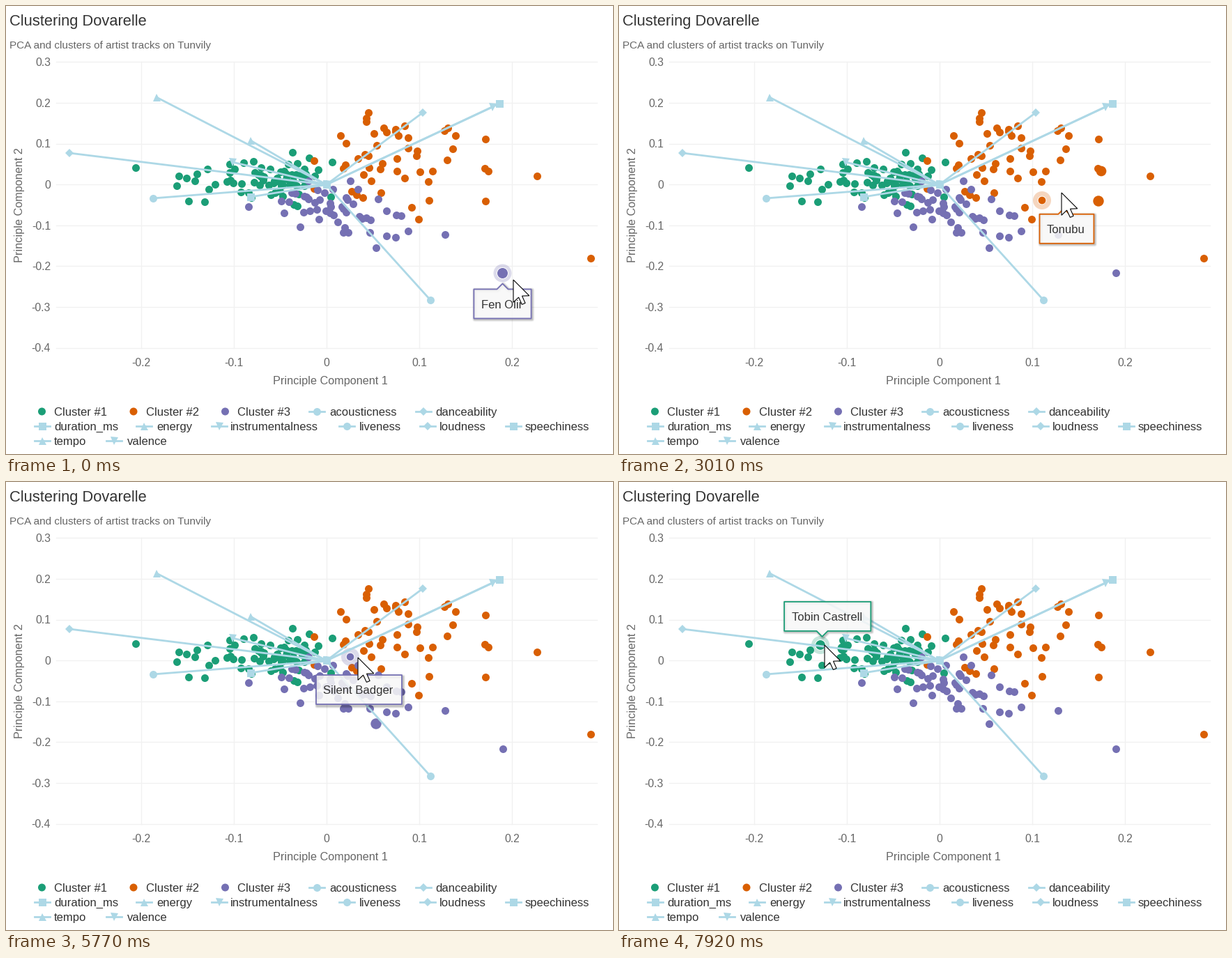
A matplotlib script that plays this animation: 871x643 px, repeating every 8000 ms.

```python
import numpy as np
import matplotlib.pyplot as plt
from matplotlib.animation import FuncAnimation
from matplotlib.patches import Circle, Polygon

W, H = 871, 643
STEP, SUB = 77, 11            # pointer refresh and easing substep, ms
FRAMES, INTERVAL = 200, 40
GREEN, ORANGE, PURPLE, BLUE = "#1b9e77", "#d95f02", "#7570b3", "#add8e6"
DARK, GREY = "#333333", "#666666"
R = 5.5

plt.rcParams["font.family"] = "Liberation Sans"
fig = plt.figure(figsize=((W + .001) / 72, (H + .001) / 72), dpi=72, facecolor="white")
ax = fig.add_axes([0, 0, 1, 1])
ax.set_xlim(0, W)
ax.set_ylim(H, 0)
ax.axis("off")


def put(x, y, s, size=16.6, color=DARK, ha="left", z=6):
    """Text whose capitals are centred on y."""
    return ax.text(x, y + .36 * size, s, fontsize=size, color=color, ha=ha,
                   va="baseline", zorder=z)


# grid and axes
for i in range(8):
    y = 80.5 + 58.6 * i
    ax.plot([72, 848], [y, y], color="#f1f1f1", lw=1.4, zorder=1)
    put(64, y, f"{0.3 - 0.1 * i:.1f}" if i != 3 else "0", 15.8, GREY, "right")
for i in range(5):
    x = 194 + 133 * i
    ax.plot([x, x], [80, 491], color="#f1f1f1", lw=1.4, zorder=1)
    put(x, 511, f"{0.1 * (i - 2):.1f}" if i != 2 else "0", 15.8, GREY, "center")
put(465.5, 537, "Principle Component 1", 16.3, GREY, "center")
ax.text(19.5, 285.5, "Principle Component 2", fontsize=16.3, color=GREY,
        rotation=90, ha="center", va="center")
put(5, 20, "Clustering Dovarelle", 21.9)
put(5, 55, "PCA and clusters of artist tracks on Tunvily", 15.3, GREY)

# clusters
rng = np.random.default_rng(4)
core = np.column_stack([rng.uniform(356, 432, 26), rng.uniform(237, 259, 26)])
green = [
    (186, 232), (248, 244), (259, 247), (245, 258), (262, 280), (271, 251),
    (274, 241), (285, 281), (289, 234), (291, 263), (300, 256), (321, 227),
    (328, 234), (321, 239), (341, 225), (355, 223), (317, 252), (322, 250),
    (326, 254), (338, 255), (337, 267), (348, 268), (352, 275), (366, 232),
    (357, 239), (366, 243), (379, 234), (411, 210), (435, 218), (418, 226),
    (405, 227), (428, 234), (448, 235), (468, 224), (399, 237), (412, 251),
    (356, 253), (364, 257), (377, 257), (380, 271), (386, 268), (413, 285),
    (418, 287), (397, 273), (393, 266), (443, 244), (466, 274), (420, 270)]
orange = [
    (520, 153), (517, 161), (517, 166), (542, 175), (546, 181), (559, 177),
    (559, 180), (572, 172), (563, 186), (577, 189), (528, 183), (480, 186),
    (488, 197), (532, 200), (577, 204), (590, 208), (589, 215), (561, 219),
    (515, 213), (520, 215), (505, 219), (487, 228), (484, 233), (540, 226),
    (537, 234), (521, 232), (513, 242), (524, 251), (561, 237), (572, 247),
    (594, 238), (612, 237), (606, 252), (633, 221), (641, 205), (645, 186),
    (629, 179), (634, 175), (688, 191), (687, 233), (692, 237), (762, 244),
    (688, 280), (607, 279), (582, 289), (592, 306), (538, 268), (496, 266),
    (503, 271), (512, 275), (442, 222), (442, 262), (839, 362)]
purple = [
    (348, 288), (399, 297), (422, 317), (395, 280), (406, 281), (410, 268),
    (415, 269), (428, 273), (434, 277), (431, 274), (447, 264), (450, 278),
    (443, 282), (446, 292), (436, 294), (427, 296), (449, 306), (457, 268),
    (469, 263), (465, 283), (466, 288), (459, 294), (465, 297), (470, 300),
    (476, 310), (482, 288), (484, 291), (488, 296), (488, 275), (490, 278),
    (498, 284), (494, 251), (505, 263), (534, 277), (546, 294), (560, 300),
    (567, 301), (507, 302), (511, 305), (517, 304), (523, 307), (486, 318),
    (491, 325), (484, 325), (522, 325), (546, 330), (559, 332), (577, 323),
    (630, 328), (531, 347), (712.5, 383.5), (434, 251)]
for pts, color in ((np.vstack([green, core]), GREEN), (orange, ORANGE), (purple, PURPLE)):
    ax.scatter(*np.transpose(pts), s=(2 * R) ** 2, color=color, linewidths=0, zorder=2)

# feature vectors
SIZE = {"o": 11, "D": 8.2, "s": 11, "^": 11, "v": 11}


def line(xs, ys, mark, every=None):
    ax.plot(xs, ys, color=BLUE, lw=2.8, marker=mark, ms=SIZE[mark], mew=0,
            markevery=every, zorder=5)


for x, y, mark in ((609, 422, "o"), (598, 153, "D"), (351, 274, "s"), (216, 131, "^"),
                   (325, 224, "v"), (211, 276, "o"), (91, 211, "D"), (708, 140, "s"),
                   (351, 193, "^"), (698, 145, "v")):
    line([459.5, x], [256.5, y], mark)

# legend
for i, color in enumerate((GREEN, ORANGE, PURPLE)):
    x = 51.5 + 131.5 * i
    ax.add_patch(Circle((x, 582), R, color=color, lw=0))
    put(x + 17.5, 582, f"Cluster #{i + 1}")
for x, tx, y, mark, name in (
        (446, 464, 582, "o", "acousticness"), (599, 616, 582, "D", "danceability"),
        (52, 69, 603, "s", "duration_ms"), (198, 216, 603, "^", "energy"),
        (305.5, 322, 603, "v", "instrumentalness"), (489, 507, 603, "o", "liveness"),
        (605, 622, 603, "D", "loudness"), (727.5, 745, 603, "s", "speechiness"),
        (51.5, 69, 624, "^", "tempo"), (155, 174, 624, "v", "valence")):
    line([x - 11, x, x + 11], [y] * 3, mark, [1])
    put(tx, y, name)

# hovered points: start ms, x, y, colour, label
HOVERS = [
    (-900, 712.5, 383.5, PURPLE, "Fen Olir"),
    (230, 839, 362, ORANGE, "Amber Quillon"),
    (740, 762, 244, ORANGE, "Nova Lanterel"),
    (1465, 688, 280, ORANGE, "Matthis Velo"),
    (1860, 692, 237, ORANGE, "Velvet Teapots"),
    (2846, 688, 280, ORANGE, "Matthis Velo"),
    (2970, 607, 279, ORANGE, "Tonubu"),
    (3520, 592, 306, ORANGE, "Pine Kettle"),
    (4600, 560, 300, PURPLE, "Nightmill"),
    (4740, 546, 294, PURPLE, "Copper Stairmen"),
    (4920, 517, 304, PURPLE, "KZF"),
    (5250, 531, 347, PURPLE, "Northern Bicyclers"),
    (5745, 494, 251, PURPLE, "Silent Badger"),
    (6300, 411, 210, GREEN, "Hollow Gardeners"),
    (6690, 399, 237, GREEN, "Coastal Attics"),
    (7500, 366, 243, GREEN, "Elda Frost"),
    (7680, 321, 239, GREEN, "Tin Meadow"),
    (7814, 289, 234, GREEN, "Tobin Castrell")]
STARTS = [h[0] for h in HOVERS]
TIP_H = 42

# pointer path: ms, x, y
PATH = np.array([
    (80, 728, 393), (400, 812, 373), (600, 824, 364), (850, 798, 342),
    (1155, 774, 258), (1300, 768, 250), (1694, 705, 267), (1940, 708, 252),
    (2200, 703, 238), (2550, 704, 244), (2800, 702, 262), (2880, 690, 271),
    (3003, 635, 268), (3390, 612, 285), (3700, 598, 303), (4010, 600, 307),
    (4390, 600, 307), (4700, 568, 296), (4850, 548, 291), (5005, 523, 298),
    (5160, 526, 318), (5400, 537, 346), (5600, 524, 303), (5775, 505, 252),
    (6000, 502, 250), (6300, 452, 232), (6600, 414, 222), (7007, 391, 238),
    (7350, 391, 241), (7600, 350, 240), (7931, 295, 234)])
ARROW = 1.9 * np.array([(0, 0), (0, 17), (4, 13.2), (6.5, 18.6), (9, 17.6),
                        (6.6, 12.2), (12, 12)])

shadows = [ax.add_patch(Polygon([(0, 0)] * 3, fill=False, ec="black", lw=lw, alpha=a,
                                joinstyle="round", zorder=7))
           for lw, a in ((7, .05), (5, .08), (3, .12))]
tip = ax.add_patch(Polygon([(0, 0)] * 3, fc=(.97, .97, .97, .87), lw=1.8,
                           joinstyle="round", zorder=8))
label = put(0, 0, "", z=9)
cursor = ax.add_patch(Polygon(ARROW, fc="white", ec="black", lw=1.1, zorder=10))
halo = ax.add_patch(Circle((0, 0), 13, alpha=.25, lw=0, zorder=3))
dot = ax.add_patch(Circle((0, 0), R, ec="white", lw=1, zorder=4))
trail = ax.scatter([], [], linewidths=0, zorder=3.5)


def tip_width(s):
    label.set_text(s)
    return label.get_window_extent().width + 23


WIDTHS = [tip_width(h[4]) for h in HOVERS]


def current(t):
    return int(np.searchsorted(STARTS, t, side="right")) - 1


def target(k):
    """Left, top and anchor of a settled tooltip."""
    _, x, y, _, _ = HOVERS[k]
    left = min(x - WIDTHS[k] / 2, 850 - WIDTHS[k])
    top = y + 23 if y > 256.5 else y - 62.5
    return np.array([left, top, x, y])


def ease_tips():
    """Left closes a third of its gap per 32 ms, the rest a half."""
    keep = np.array([2 / 3, .5, .5, .5]) ** (SUB / 32)
    pos, out = target(0), []
    for t in range(0, FRAMES * INTERVAL + STEP, SUB):
        goal = target(current(t))
        pos = goal + (pos - goal) * keep
        if t % STEP == 0:
            out.append(pos)
    return out


TIPS = ease_tips()


def callout(left, top, px, py, w):
    right, low = left + w, top + TIP_H
    px = np.clip(px, left + 11, right - 11)
    pts = [(left, top)]
    if py < top:
        pts += [(px - 8, top), (px, top - 8), (px + 8, top)]
    pts += [(right, top), (right, low)]
    if py > low:
        pts += [(px + 8, low), (px, low + 8), (px - 8, low)]
    return np.array(pts + [(left, low)])


def draw(i):
    n = (i * INTERVAL + INTERVAL // 2) // STEP
    t = n * STEP
    k = current(t)
    start, x, y, color, name = HOVERS[k]

    halo.center = dot.center = x, y
    halo.set_facecolor(color)
    dot.set_facecolor(color)
    dot.set_radius(5.3 + 2.7 * min(1, (t - start) / 150))

    spots, sizes, colors = [(-50, -50)], [0], [color]
    for h, end in zip(HOVERS[:k], STARTS[1:]):
        if t - end < 450:
            r = 7.7 - 2.2 * np.clip((t - end - 100) / 350, 0, 1)
            spots.append(h[1:3])
            sizes.append((2 * r) ** 2)
            colors.append(h[3])
    trail.set_offsets(spots)
    trail.set_sizes(sizes)
    trail.set_facecolor(colors)

    left, top, px, py = TIPS[n]
    shape = callout(left, top, px, py, WIDTHS[k])
    tip.set_xy(shape)
    tip.set_edgecolor(color)
    for s in shadows:
        s.set_xy(shape + 1.2)
    label.set_text(name)
    label.set_position((left + 10.5, top + 21 + 6))

    tx, ty = (np.interp(t, PATH[:, 0], PATH[:, c]) for c in (1, 2))
    cursor.set_xy(ARROW + (tx, ty))
    return [halo, dot, trail, *shadows, tip, label, cursor]


anim = FuncAnimation(fig, draw, frames=FRAMES, interval=INTERVAL,
                     init_func=lambda: draw(0), repeat=True, repeat_delay=0)
plt.show()
```
